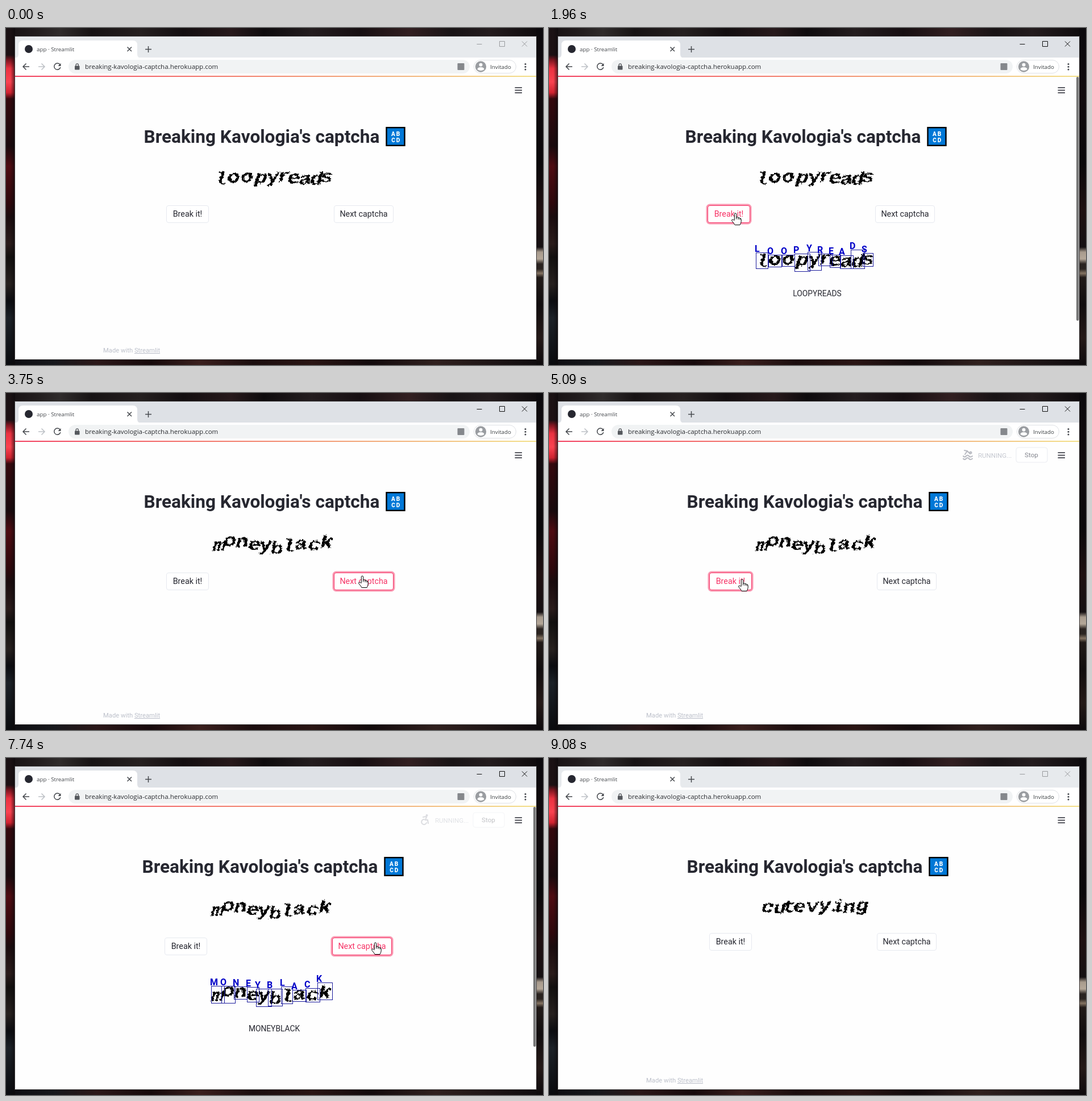
Animation, 945 px wide and 593 px high, one loop 9.22 s. Source, as an HTML page:

```html
<!DOCTYPE html>
<html lang="en">
<head>
<meta charset="utf-8">
<title>Captcha demo</title>
<style>
html, body { margin: 0; width: 100%; height: 100%; overflow: hidden; background: #0d0a0c; }
#stage { position: relative; width: 945px; height: 593px; overflow: hidden; }
#stage > svg, #page, #page > svg { position: absolute; left: 0; top: 0; overflow: hidden; }
#page { width: 945px; height: 593px; }
.strip { position: absolute; }
.top { left: 0; top: 0; width: 945px; height: 16px;
  background: linear-gradient(90deg, #150f11, #231e1f 6%, #302c2c 10%, #171314 16%, #262020 25%, #130e10 33%, #27191b 42%, #0e0b0d 48%, #241d1f 57%, #160e11 66%, #321f21 75%, #181315 83%, #241c1e 90%, #0c090b); }
.bottom { left: 0; top: 583px; width: 945px; height: 10px;
  background: linear-gradient(90deg, #0c0c10, #17181c 9%, #2b1718 17%, #16090b 27%, #3a1f1d 36%, #1b0d0e 46%, #2a1514 57%, #120a0c 68%, #30201e 80%, #0e0b0e); }
.left { left: 0; top: 0; width: 16px; height: 593px;
  background: linear-gradient(90deg, transparent 50%, #0d0a0cb0),
    linear-gradient(#1a1214, #1c1013 8%, #7e1620 9.5%, #ea3241 12%, #fa4350 16%, #d02330 19.2%, #35090e 21%, #190a0d 35%, #4e0c12 41%, #2e080c 52%, #1a0c0e 56%, #2a1c1b 64%, #12100f 68%, #27211f 76%, #0b0c10 81%, #1c2127 86%, #0a0b0e); }
.right { left: 933px; top: 0; width: 12px; height: 593px;
  background: linear-gradient(#0b090c, #120b0e 20%, #0a080a 40%, #1f1011 54%, #151012 65%, #a89b8d 66.5%, #b5a899 68.5%, #2a2320 70%, #2a2320 71.5%, #857463 72.8%, #211a18 74%, #110d0e 82%, #241917 92%, #0d0a0c); }

svg text { white-space: pre; }
.ui { font-family: "Open Sans", "Noto Sans", sans-serif; }
.app { font-family: Roboto, Inter, sans-serif; }
.word { font: bold 31px "Liberation Mono", "DejaVu Sans Mono", monospace; fill: #000; text-anchor: middle; }
.tag { font: bold 16px Roboto, sans-serif; fill: #0000c8; }
.box { fill: none; stroke: #1c1c9c; }
.btn { position: absolute; box-sizing: border-box; height: 31px; line-height: 29px; text-align: center;
  border: 1px solid #e6e9ef; border-radius: 4px; background: #fff; color: #262730; font-size: 14.3px; white-space: nowrap; }
#break { left: 282px; width: 75px; }
#next { left: 577px; width: 105px; }

/* every timeline shares the 9220 ms loop */
.step, .btn, .flow { animation: 9220ms step-end infinite; }
.flow { animation-timing-function: linear; }
#break { animation-name: drop, breakHot; }
#next { animation-name: drop, nextHot; }
#page { animation-name: shift; }
#foot { animation-name: foot; }
#word0 { animation-name: word0; }
#word1 { animation-name: word1; }
#word2 { animation-name: word2; }
#result0 { animation-name: result0; }
#result1 { animation-name: result1; }
#strip { animation-name: tabs; }
#controls { animation-name: controls; }
#run { animation-name: run; }
#runner { animation-name: runner; }
#swimmer { animation-name: swimmer; }
#chair { animation-name: chair; }
#expand { animation-name: expand; }
#cursor { animation-name: move; }
#arrow { animation-name: arrow; }
#hand { animation-name: hand; }

@keyframes tabs { 0%, 98.482%, 100% { fill: #e7eaed } 13.558% { fill: #dee1e6 } }
@keyframes controls { 0%, 98.482%, 100% { stroke: #999b9e } 13.558% { stroke: #111 } }
@keyframes shift {
  0%, 37.961%, 88.395%, 100% { transform: none }
  18.655%, 58.568% { transform: translateX(-3px) }
}
@keyframes foot { 0%, 37.961%, 88.395%, 100% { opacity: 1 } 18.655%, 58.568% { opacity: 0 } }
@keyframes word0 { 0% { opacity: 1 } 37.961%, 100% { opacity: 0 } }
@keyframes word1 { 0%, 88.395%, 100% { opacity: 0 } 37.961% { opacity: 1 } }
@keyframes word2 { 0% { opacity: 0 } 88.395%, 100% { opacity: 1 } }
@keyframes result0 { 0%, 37.961%, 100% { opacity: 0 } 18.655% { opacity: 1 } }
@keyframes result1 { 0%, 88.395%, 100% { opacity: 0 } 58.568% { opacity: 1 } }
@keyframes drop { 0% { top: 312px } 37.961% { top: 316px } 88.395%, 100% { top: 308px } }
@keyframes breakHot {
  0%, 32.972%, 81.562%, 100% { color: #262730; border-color: #e6e9ef; box-shadow: none }
  12.473%, 51.432% { color: #f63366; border-color: #f63366; box-shadow: none }
  13.558%, 51.844% { color: #f63366; border-color: #f63366; box-shadow: 0 0 0 2.5px #fa99b2 }
}
@keyframes nextHot {
  0%, 51.844%, 98.482%, 100% { color: #262730; border-color: #e6e9ef; box-shadow: none }
  30.369%, 79.284% { color: #f63366; border-color: #f63366; box-shadow: none }
  32.972%, 81.562% { color: #f63366; border-color: #f63366; box-shadow: 0 0 0 2.5px #fa99b2 }
}
@keyframes run {
  0%, 14.317% { opacity: 0 } 16.811%, 18.655% { opacity: 1 } 21.258%, 32.972% { opacity: 0 }
  35.249%, 37.961% { opacity: 1 } 40.672%, 53.579% { opacity: 0 }
  55.098%, 58.568% { opacity: 1 } 61.063%, 83.08% { opacity: 0 }
  84.816%, 88.395% { opacity: 1 } 91.106%, 100% { opacity: 0 }
}
@keyframes runner { 0% { opacity: 1 } 50%, 100% { opacity: 0 } }
@keyframes swimmer { 0%, 75%, 100% { opacity: 0 } 50% { opacity: 1 } }
@keyframes chair { 0% { opacity: 0 } 75%, 100% { opacity: 1 } }
@keyframes expand { 0%, 72.017%, 79.935%, 100% { opacity: 0 } 72.885%, 78.09% { opacity: 1 } }
@keyframes move {
  0% { transform: translate(950px, 597px); animation-timing-function: step-end }
  .759%, 4.121% { transform: translate(935px, 582px) }
  12.798% { transform: translate(330px, 330px) }
  13.558%, 22.777% { transform: translate(328px, 326px) }
  27.115% { transform: translate(480px, 338px) }
  32.104% { transform: translate(627px, 324px) }
  32.972%, 44.794% { transform: translate(627px, 322px) }
  47.722% { transform: translate(500px, 338px) }
  51.844%, 69.631% { transform: translate(340px, 328px) }
  72.993% { transform: translate(545px, 409px) }
  74.837% { transform: translate(592px, 462px) }
  76.464% { transform: translate(640px, 440px) }
  79.067% { transform: translate(652px, 352px) }
  79.935% { transform: translate(650px, 330px) }
  81.562%, 85.683% { transform: translate(650px, 325px) }
  88.395% { transform: translate(720px, 400px) }
  92.516% { transform: translate(895px, 523px) }
  93.167% { transform: translate(925px, 530px) }
  94.035% { transform: translate(950px, 550px); animation-timing-function: step-end }
  95.77% { transform: translate(941px, 591px); animation-timing-function: step-end }
  96.529%, 100% { transform: translate(950px, 597px) }
}
@keyframes arrow {
  0%, 23.536%, 45.944%, 69.848%, 86.497%, 100% { opacity: 1 }
  12.473%, 30.369%, 51.432%, 79.284% { opacity: 0 }
}
@keyframes hand {
  0%, 23.536%, 45.944%, 69.848%, 86.497%, 100% { opacity: 0 }
  12.473%, 30.369%, 51.432%, 79.284% { opacity: 1 }
}
</style>
</head>
<body>
<div id="stage">
  <div class="strip top"></div><div class="strip bottom"></div>
  <div class="strip left"></div><div class="strip right"></div>

  <svg width="945" height="593">
    <defs>
      <linearGradient id="bar"><stop stop-color="#f2405f"/><stop offset=".5" stop-color="#f28a70"/><stop offset="1" stop-color="#f3e08a"/></linearGradient>
    </defs>
    <rect x="15.500" y="14.500" width="918" height="569" fill="#fefefe" stroke="#3c3a3b"/>
    <rect id="strip" class="step" x="16" y="15" width="917" height="38" fill="#e7eaed"/>
    <path d="M16 53Q22 52 22 46V30Q22 22 30 22H223Q231 22 231 30V46Q231 52 237 53Z" fill="#fff"/>
    <rect x="16" y="52" width="917" height="32" fill="#fff"/>
    <rect x="16" y="84" width="917" height="2" fill="url(#bar)"/>

    <circle cx="40" cy="37" r="7" fill="#262730"/>
    <text class="ui" x="54" y="41" font-size="9.8" fill="#45484d">app · Streamlit</text>
    <g fill="none" stroke="#45484d" stroke-width="1.5">
      <path d="M213.5 33.5l7.500 7.500m0-7.500l-7.500 7.500M245 37.500h11M250.500 32v11"/>
      <path d="M41 68H30m5.500-5.500L30 68l5.500 5.500"/>
      <path d="M57 68h11m-5.500-5.500L68 68l-5.500 5.500" stroke="#bdc1c6"/>
      <path d="M95 64.500a5.600 5.600 0 1 0 .8 4.500"/>
      <path d="M96.500 62v5h-5z" fill="#45484d" stroke="none"/>
    </g>
    <g id="controls" class="step" fill="none" stroke="#999b9e">
      <path d="M828.500 28.500h9M868.500 23.500h9v9h-9zM908 23.500l9 9m0-9l-9 9"/>
    </g>

    <rect x="110" y="56" width="706" height="24" rx="12" fill="#f1f3f4"/>
    <rect x="121" y="66.500" width="8.500" height="7" rx="1" fill="#55585d"/>
    <path d="M123 67v-2a2.200 2.200 0 0 1 4.400 0v2" fill="none" stroke="#55585d" stroke-width="1.300"/>
    <text class="ui" x="139" y="72" font-size="11.500" fill="#2b2d31">breaking-kavologia-captcha.herokuapp.com</text>
    <rect x="794.500" y="62" width="12" height="12" rx="1" fill="#85888c"/>
    <rect x="823.500" y="56.500" width="74" height="23" rx="11.500" fill="#fff" stroke="#dfe1e5"/>
    <circle cx="835.500" cy="68" r="9.700" fill="#9a9da1"/>
    <circle cx="835.500" cy="64.800" r="3" fill="#fff"/>
    <path d="M829.500 73q0-4 6-4t6 4q-6 4-12 0z" fill="#fff"/>
    <text class="ui" x="852" y="71.500" font-size="9.8" fill="#3c4043">Invitado</text>
    <g fill="#45484d"><circle cx="914" cy="63.500" r="1.500"/><circle cx="914" cy="68.200" r="1.500"/><circle cx="914" cy="73" r="1.500"/></g>

    <path d="M895.500 105h12.500m-12.500 4.500h12.500m-12.500 4.500h12.500" stroke="#262730" stroke-width="1.700"/>
    <g id="run" class="flow" opacity="0">
      <g fill="none" stroke="#b9bbc2" stroke-width="2" stroke-linecap="round">
        <g id="runner" class="step"><circle cx="739" cy="102" r="1"/><path d="M732 108l3-3h4l2 3h3M738 106l-2 5 4 2-1 4M736 111l-2 3h-4"/></g>
        <g id="swimmer" class="step"><circle cx="742" cy="105" r="1.500"/><path d="M731 101l5 1 5 5M736 102l-4 6M729 111q2.500 3 5 0t5 0 6 0M729 115.500q2.500 3 5 0t5 0 6 0"/></g>
        <g id="chair" class="step"><circle cx="740.500" cy="101" r="1"/><path d="M734 104l4-1 2 1-2 5h4l1 6M736 108a4.500 4.500 0 1 0 4 6"/></g>
      </g>
      <text class="app" x="755" y="114" font-size="11.500" fill="#c5c8d0">RUNNING...</text>
      <rect x="822" y="96" width="55" height="26" rx="4" fill="#fff" stroke="#e9ebf0"/>
      <text class="app" x="849" y="113" font-size="11.700" text-anchor="middle" fill="#85878f">Stop</text>
    </g>
    <path id="expand" class="flow" opacity="0" d="M786.500 373v-5h5M786.500 368l5 5M798.500 375v5h-5m5 0l-5-5" fill="none" stroke="#8f9197" stroke-width="1.800"/>
  </svg>

  <div id="page" class="step app">
    <svg width="945" height="593" viewBox="0 0 945 593">
      <filter id="rough" filterUnits="userSpaceOnUse" x="340" y="225" width="260" height="230" color-interpolation-filters="sRGB">
        <feTurbulence type="fractalNoise" baseFrequency=".3" numOctaves="1" seed="7"/>
        <feDisplacementMap in="SourceGraphic" scale="7" xChannelSelector="R" yChannelSelector="G"/>
        <feGaussianBlur stdDeviation=".35"/>
      </filter>
      <text x="450" y="202" font-size="31.600" font-weight="700" text-anchor="middle" fill="#262730">Breaking Kavologia's captcha</text>
      <rect x="669.500" y="175.200" width="32" height="31.600" fill="#0078d7" stroke="#000" stroke-width="2.400"/>
      <g font-size="10" font-weight="900" text-anchor="middle" fill="#fff">
        <text x="681.500" y="190">A</text><text x="690" y="190">B</text>
        <text x="681.500" y="201">C</text><text x="690" y="201">D</text>
      </g>
      <g id="word0" class="step"></g><g id="word1" class="step"></g><g id="word2" class="step"></g>
      <g id="result0" class="step"></g><g id="result1" class="step"></g>
      <text id="foot" class="step" x="171" y="571" font-size="11.250" fill="#bcc0ca">Made with <tspan text-decoration="underline">Streamlit</tspan></text>
    </svg>
    <div id="break" class="btn">Break it!</div>
    <div id="next" class="btn">Next captcha</div>
  </div>

  <svg width="945" height="593">
    <g id="cursor" class="flow" stroke-linejoin="round">
      <path id="arrow" class="step" d="M0 0V16l3.700-3.500L6.200 18l2.300-1-2.400-5.400H11z" fill="#fff" stroke="#000"/>
      <path id="hand" class="step" d="M-1.700 12V1.500Q-1.700 0 0 0T1.700 1.500V7Q4.500 5.600 5 8 7.300 6.800 8 9q2.200-.5 2.200 2V14.500Q10 17 8 20.500H-1Q-2.500 17.500-6 13.500q-1-2 .5-2.500Q-3.500 10.500-1.700 13M1.700 7v3.500M5 8v3M8 9v2.500" fill="#fff" stroke="#000"/>
    </g>
  </svg>
</div>

<script>
// boxes: left, top, right, bottom of each letter, plus an optional lift of its baseline
const words = [
  { text: "loopyreads", drop: 145, capY: 472, bar: 429, boxes: [
    [364, 395, 385, 423], [386, 399, 409, 420], [410, 399, 432, 419], [432, 397, 459, 428], [455, 394, 479, 426],
    [474, 397, 498, 418], [494, 399, 513, 421], [512, 400, 535, 423], [531, 390, 555, 423], [552, 396, 570, 419]] },
  { text: "moneyblack", drop: 150, capY: 481, bar: 422, boxes: [
    [361, 401, 384, 431], [379, 401, 403, 431, 9], [401, 402, 424, 424], [424, 403, 445, 429], [440, 406, 467, 437],
    [461, 406, 486, 436], [484, 402, 504, 432], [504, 408, 528, 428], [527, 405, 552, 429], [548, 395, 574, 425]] },
  { text: "cutevying", drop: 0, boxes: [
    [371, 255, 393, 275], [393, 254, 414, 276], [411, 248, 428, 274], [427, 252, 449, 274], [449, 252, 472, 273],
    [470, 252, 494, 279], [496, 245, 515, 273], [514, 248, 536, 275], [536, 250, 560, 279]] }
];

const make = (parent, tag, attrs, text = "") => {
  const el = document.createElementNS("http://www.w3.org/2000/svg", tag);
  for (const key in attrs) el.setAttribute(key, attrs[key]);
  el.textContent = text;
  return parent.appendChild(el);
};

// each letter is slanted, widened and tilted a little, then roughened
function drawWord(parent, word, dy) {
  const g = make(make(parent, "g", { transform: `translate(3 ${dy})` }), "g", { class: "word", filter: "url(#rough)" });
  word.boxes.forEach(([l, , r, b, lift = 0], i) => {
    const y = b - lift - ("pyg".includes(word.text[i]) ? 10 : 3);
    const tilt = Math.sin(i * 2.3 + 1) * 5;
    make(g, "text", { y: 8, transform: `translate(${(l + r) / 2} ${y - 8}) rotate(${tilt}) skewX(-12) scale(1.2 1)` }, word.text[i]);
  });
}

function drawResult(parent, word) {
  drawWord(parent, word, 0);
  const g = make(parent, "g", { transform: "translate(3 0)" });
  const caps = word.text.toUpperCase();
  word.boxes.forEach(([l, t, r, b], i) => {
    make(g, "rect", { class: "box", x: l + .5, y: t + .5, width: r - l, height: b - t });
    make(g, "text", { class: "tag", x: l - 2, y: t - 1 }, caps[i]);
  });
  make(g, "text", { x: 472, y: word.capY, "font-size": 13.8, "text-anchor": "middle", fill: "#262730" }, caps);
  make(g, "rect", { x: 928, y: 86, width: 4.5, height: word.bar, rx: 2, fill: "#777" });
}

words.forEach((word, i) => {
  drawWord(document.getElementById("word" + i), word, -word.drop);
  const result = document.getElementById("result" + i);
  if (result) drawResult(result, word);
});
</script>
</body>
</html>
```
